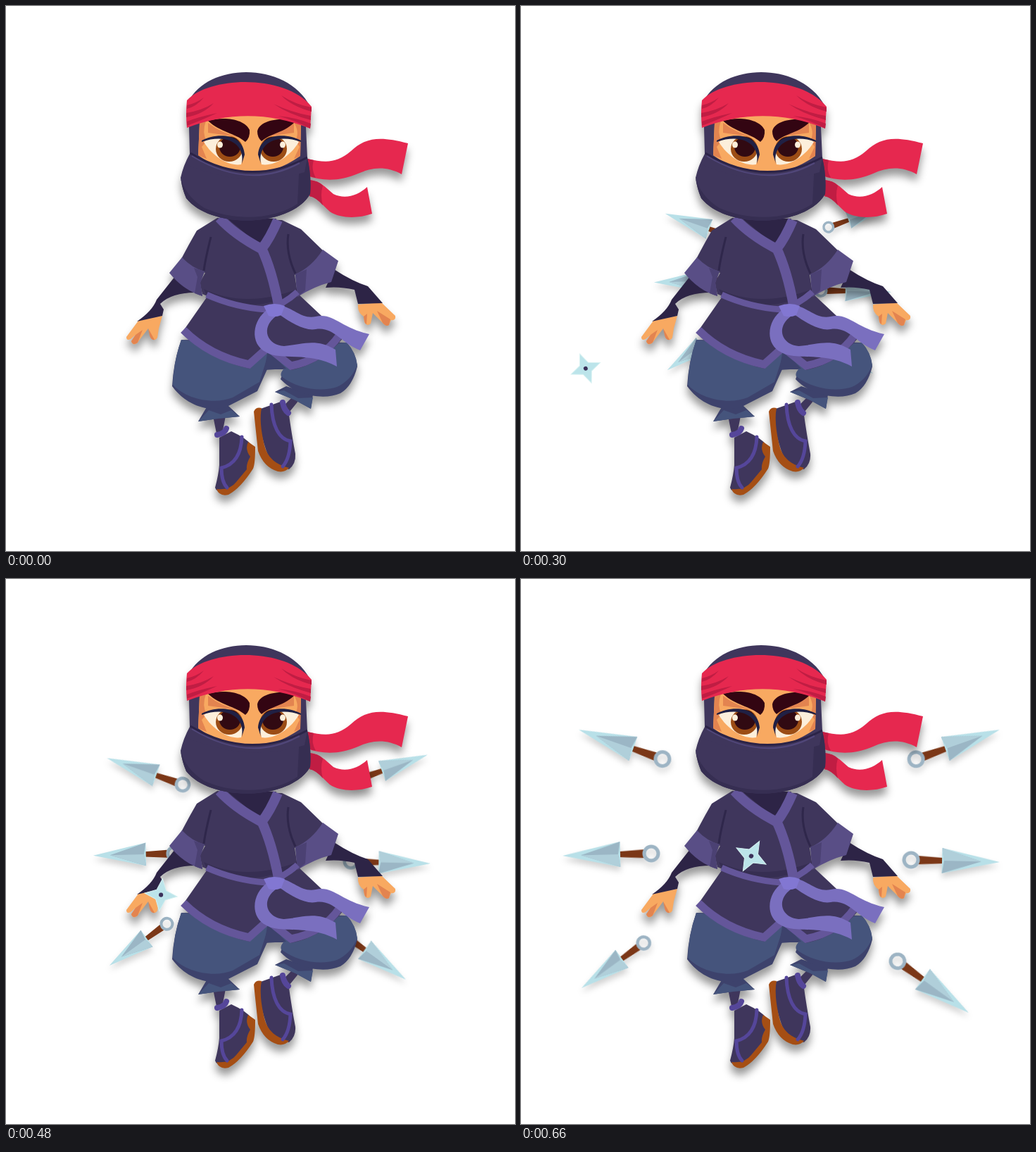
An HTML page that plays this animation: 723 by 774 pixels, repeating every 1430 ms.

```html
<!DOCTYPE html>
<html lang="en">
<head>
<meta charset="utf-8">
<title>Ninja</title>
<style>
  html, body { margin: 0; width: 100%; height: 100%; overflow: hidden; background: #fff; }
  svg { display: block; width: 723px; height: 774px; }
  .shadow { filter: drop-shadow(0 10px 6px rgba(0,0,0,.4)); }
  .soft { filter: drop-shadow(0 6px 4px rgba(0,0,0,.18)); }
  .cloth { fill: #3f365c; }
  .dark { fill: #2d2446; }
  .shade { fill: #362e52; }
  .cuff { fill: #594e86; }
  .pants { fill: #45547c; }
  .fold { fill: #3d426c; }
  .red { fill: #e6284f; }
  .crimson { fill: #c01d43; }
  .skin { fill: #f8a961; }
  .blush { fill: #e38450; }
  .sole { fill: #a54e14; }
  .sash { fill: #7a6fbf; }
  .trim, .lace, .crease { fill: none; stroke: #64569a; }
  .lace { stroke: #55469a; stroke-width: 5; stroke-linecap: round; }
  .crease { stroke: #2f274b; stroke-width: 3; }
</style>
</head>
<body>
<svg viewBox="0 0 723 774">
  <defs>
    <g id="knife">
      <path fill="#7b3717" d="M80 -4L115 -6V6L80 4Z"/>
      <circle cx="126" r="10" fill="none" stroke="#9db4c4" stroke-width="5"/>
      <path fill="#b8e0e8" d="M0 0L82 -18V18Z"/>
      <path fill="#9bb6c5" d="M26 0L82 -18L79 0L82 18Z"/>
      <path fill="#b0cfda" d="M26 0L79 0L82 18Z"/>
    </g>
    <g id="eye">
      <path fill="#fcefdb" d="M281 193C296 182 329 182 337 211L334 225C318 228 294 215 281 193Z"/>
      <ellipse cx="317" cy="203" rx="19" ry="18" fill="#9c4d15"/>
      <ellipse cx="318" cy="200" rx="15" ry="14" fill="#310a12"/>
      <ellipse cx="304" cy="197" rx="4" ry="4.5" fill="#fcefdb"/>
      <path fill="#202044" d="M278 191C300 179 337 181 339 211L335 224C340 196 314 180 278 193Z"/>
    </g>
  </defs>

  <g id="knives" class="soft"></g>

  <g class="shadow">
    <!-- legs and shoes -->
    <path class="cloth" d="M294 582H312L308 603L299 607ZM396 566L410 552L416 560L403 576Z"/>
    <path class="cloth" d="M303 613L320 604Q342 614 349 624L346 660L316 690Q299 692 297 684Q302 665 303 652Z"/>
    <path class="sole" d="M344 619L354 626Q354 650 351 657Q333 685 316 694Q303 697 299 686Q318 688 327 676L342 658Q341 650 347 640Q339 630 344 619Z"/>
    <path class="cloth" d="M359 573L390 562L401 574Q406 610 411 636Q412 650 402 658L378 652Q359 610 359 573Z"/>
    <path class="sole" d="M352 576Q355 569 363 571Q359 590 367 624Q373 649 402 656Q396 663 386 661Q366 655 358 632Z"/>
    <path class="lace" d="M335 612C334 640 322 652 306 656Q306 676 314 684M377 566C378 595 387 615 404 618Q403 643 393 654"/>
    <path class="lace" style="stroke-width:8" d="M300 609Q311 607 313 600M393 563Q395 574 401 578"/>

    <!-- trousers -->
    <path class="fold" d="M286 568L273 590L301 586L332 583L316 568ZM398 540L382 548L411 560L433 572L436 552Z"/>
    <path class="pants" d="M288 574L273 590L301 586L332 583L320 574L305 580ZM395 546L382 548L411 560L433 572L436 556L415 557Z"/>
    <path class="fold" d="M249 474Q238 505 236 540C255 566 285 577 312 570L357 547L371 516H395L390 530C410 552 450 561 475 550Q492 540 499 512Q497 492 484 478Z"/>
    <path class="pants" d="M249 474Q238 505 237 538C255 558 295 567 322 556L360 534L374 490ZM372 490L394 516Q389 522 391 526C415 545 450 548 470 541Q490 532 499 510Q497 492 484 478Z"/>
    <path class="fold" d="M372 488L398 515L367 517Z"/>

    <!-- arms and hands -->
    <path class="skin" d="M188 447L171 470Q171 476 177 473L184 467L178 476Q180 483 186 479L202 458L207 472Q212 477 215 471L217 458L222 440Z"/>
    <path class="blush" d="M184 467L194 460L187 478Q180 483 178 476ZM202 458L211 474Q206 475 204 468Z"/>
    <path class="dark" d="M240 384L214 417Q208 433 186 448L222 440L224 431L219 423Q235 407 270 407Z"/>
    <path class="skin" d="M500 424L533 421L553 440Q554 447 547 446L544 453Q540 456 535 450L521 436L518 451Q513 456 509 449L508 441Q499 435 500 424Z"/>
    <path class="blush" d="M527 433L546 445L544 453Q540 456 535 450ZM508 441L513 437L512 452Q509 451 508 441Z"/>
    <path class="dark" d="M466 374Q492 391 514 398L535 422L500 423L495 403Q474 398 454 400Z"/>

    <!-- tunic -->
    <path class="cloth" d="M287 411L250 464Q290 503 346 515L374 487L405 517Q450 508 480 470L414 408Z"/>
    <path class="trim" stroke-width="11" d="M252 460Q289 497 345 509L372 485L405 511Q450 502 474 467"/>
    <path class="cloth" d="M300 301L271 319Q260 338 249 359Q264 374 283 379L275 393L279 409Q350 442 414 407L410 382Q436 371 451 348L419 317L392 304Z"/>
    <path class="shade" d="M281 402Q340 430 414 402V407Q345 441 284 409Z"/>
    <path class="cuff" d="M250 357Q264 372 282 377L276 393L279 412Q252 404 232 379ZM450 346L472 362L462 392Q438 398 414 413L411 381Q434 371 450 346Z"/>
    <path fill="#4b4173" d="M267 372L282 377L276 393L279 412L268 408L272 385ZM411 381L427 374L425 404L414 413Z"/>
    <path class="crease" d="M291 328Q283 360 281 376M401 324Q397 350 411 380"/>
    <path class="dark" d="M311 299L362 341L384 302Z"/>
    <path class="trim" stroke-width="14" d="M303 301Q325 325 363 345Q375 330 386 304M363 344Q378 376 387 425"/>
    <path class="trim" stroke-width="9" d="M285 410Q325 428 370 431Q393 425 414 406"/>

    <!-- sash -->
    <path class="sash" d="M390 425C410 430 420 445 440 441C465 435 475 457 516 466L503 489C475 478 465 455 440 459C425 462 405 450 388 438Z"/>
    <path class="sash" d="M372 431C350 445 345 480 370 492C390 504 430 490 470 512L468 488C440 472 425 480 395 483C372 482 360 458 384 440Z"/>
    <path fill="#8277d2" d="M366 426Q382 420 396 426L391 439Q382 443 373 440Z"/>

    <!-- headband tails -->
    <path class="red" d="M428 217C455 223 470 223 490 206C510 187 530 184 571 195L562 239C540 227 520 229 500 238C475 249 450 249 428 241ZM431 247C447 249 452 256 465 267C482 275 500 269 513 257L520 295C500 302 475 302 460 292C448 281 442 272 431 270Z"/>
    <path class="crimson" d="M428 217L437 219Q433 232 440 244L428 241ZM431 247Q444 248 450 255Q446 268 450 283Q441 272 431 270Z"/>

    <!-- head -->
    <path class="cloth" d="M259 136C288 79 400 79 432 143L426 172L428 216Q434 240 432 267C405 314 292 318 256 273Q250 259 248 244Q252 226 261 210L260 172Z"/>
    <path class="shade" d="M248 244Q255 270 282 287C330 308 385 301 414 281L417 220L428 216Q434 240 432 267C405 314 292 318 256 273Q250 259 248 244Z"/>
    <path class="skin" d="M275 166L273 212Q345 264 418 213L419 165Q345 135 275 166Z"/>
    <path class="blush" d="M275 166L284 163Q278 180 285 192L278 200L285 217L273 212ZM419 165L408 163Q418 180 411 191L417 200L409 217L418 213ZM287 166Q305 180 330 186L287 180ZM409 166Q390 180 366 186L409 180Z"/>
    <use href="#eye"/>
    <use href="#eye" transform="matrix(-1 0 0 1 697 0)"/>
    <path fill="#330512" d="M287 163C310 156 340 161 346 176Q347 187 340 193C325 180 305 180 287 163ZM411 164C388 157 360 163 357 178Q357 187 363 192C379 179 394 181 411 164Z"/>
    <path class="cloth" d="M262 209Q345 259 428 216L424 236Q345 262 256 225Z"/>
    <path fill="none" stroke="#2b2347" stroke-width="3" d="M262 209Q345 259 428 215"/>
    <path fill="none" stroke="#51477a" stroke-width="2" d="M264 213Q345 262 417 223"/>
    <path class="red" d="M257 134C290 99 398 97 434 143L432 174Q345 139 257 173Q255 153 257 134Z"/>
    <path class="crimson" d="M256 152Q279 148 295 138Q280 154 256 158ZM257 164Q275 157 300 152Q276 163 257 170ZM257 141Q270 138 281 130Q270 143 257 146ZM434 150Q405 142 391 127Q411 140 434 144ZM433 162Q402 154 380 139Q405 151 433 156ZM432 174Q410 162 386 156Q415 159 433 167Z"/>
  </g>

  <g id="star">
    <path fill="#bce4ea" stroke="#d6f1f1" stroke-width="1" d="M0 -24L7 -7L24 0L7 7L0 24L-7 7L-24 0L-7 -7Z"/>
    <circle r="3.2" fill="#3b315a"/>
  </g>
</svg>
<script>
const LOOP = 1430, STEP = 30, END = 660, STAR_END = 630;

// tip at start, tip at end, angle, scale at start, scale at end
const knives = [
  [307, 362, 82, 214, 19.3, .65, 1],
  [297, 392, 59, 393, -1.4, .68, 1],
  [309, 464, 86, 581, -36, .63, .865],
  [383, 345, 680, 214, 160.6, .42, 1],
  [398, 410, 680, 402, 181.4, .63, 1],
  [387, 444, 636, 616, 215.9, .6, .99]
];
const star = document.getElementById('star');
const parts = knives.map(() => {
  const use = document.createElementNS('http://www.w3.org/2000/svg', 'use');
  use.setAttribute('href', '#knife');
  return document.getElementById('knives').appendChild(use);
});

const mix = (a, b, p) => a + (b - a) * p;
const place = (el, x, y, angle, scale) =>
  el.setAttribute('transform', `translate(${x} ${y}) rotate(${angle}) scale(${scale})`);

function draw(now) {
  const t = Math.min(END, Math.floor(now % LOOP / STEP) * STEP);
  const p = t / END;
  knives.forEach(([x0, y0, x1, y1, angle, s0, s1], i) =>
    place(parts[i], mix(x0, x1, p), mix(y0, y1, p), angle, mix(s0, s1, p)));
  const q = Math.min(1, t / STAR_END);
  place(star, mix(-122, 327, q), mix(625, 393.5, q), mix(-68, 29, q), mix(.86, 1, q));
}

let start;
function tick(now) {
  start ??= now;
  draw(now - start);
  requestAnimationFrame(tick);
}
draw(0);
requestAnimationFrame(tick);
</script>
</body>
</html>
```
